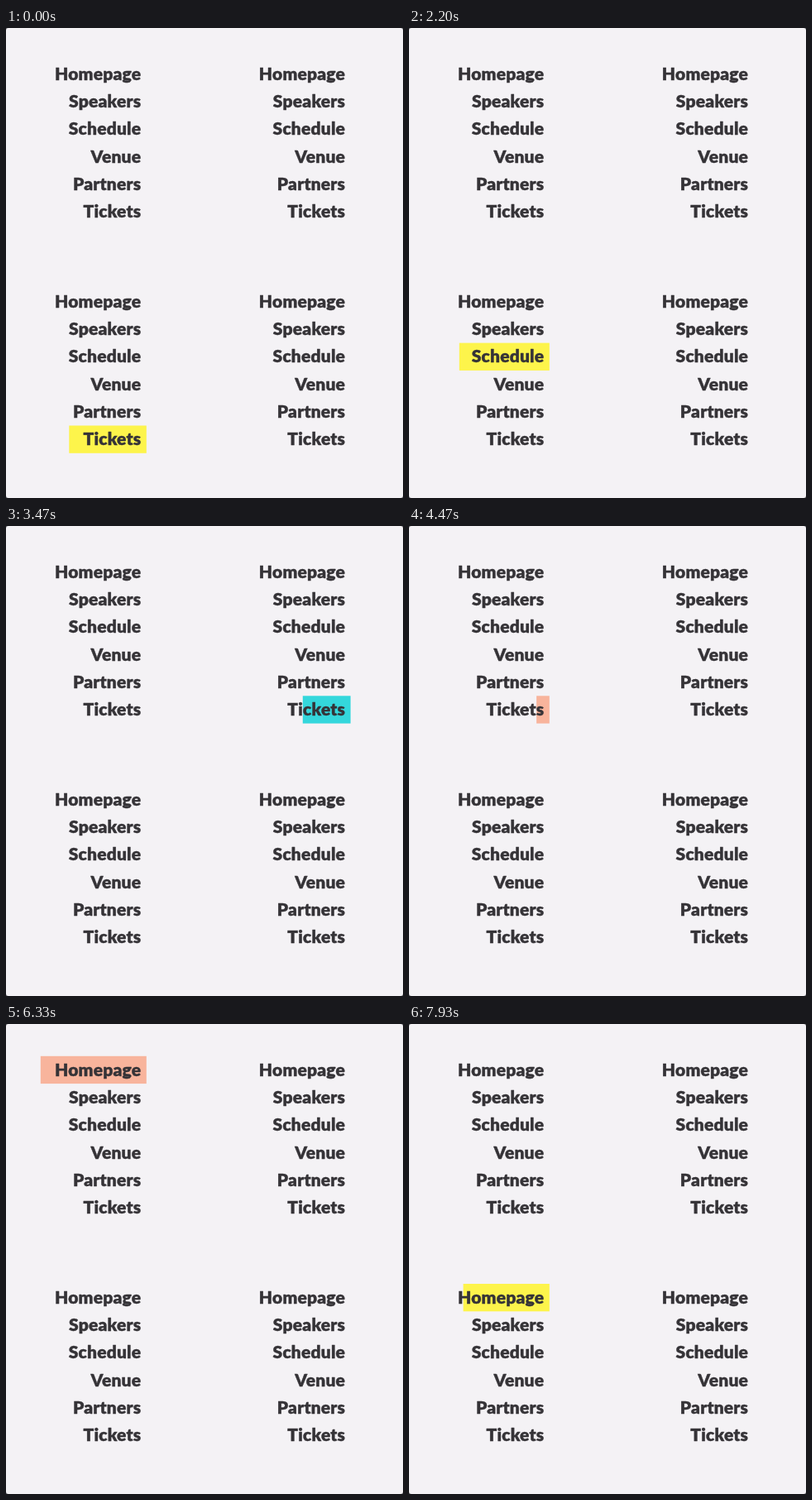
An HTML page with a canvas that plays this animation: 480 px wide and 568 px high, repeating every 8 s.

```html
<!DOCTYPE html>
<html lang="en">
<head>
<meta charset="utf-8">
<title>Menu hover highlights</title>
<style>
  html, body { margin: 0; width: 100%; height: 100%; overflow: hidden; background: #f4f2f5; }
  canvas { display: block; width: 480px; height: 568px; }
</style>
</head>
<body>
<canvas id="stage"></canvas>
<script>
const W = 480, H = 568, LOOP = 8000, FADE = 500;
const ROW = 33.3, TOP = 38.8;
const labels = ['Homepage', 'Speakers', 'Schedule', 'Venue', 'Partners', 'Tickets'];
const barWidths = [128, 110, 109, 86, 107, 93.5];

// Each menu: right edge of its bars, vertical offset, bar colour
const menus = {
  tl: { right: 169.8, dy: 0, color: '#f8b49c' },
  tr: { right: 416.6, dy: 0, color: '#34d7dc' },
  bl: { right: 169.8, dy: 275.2, color: '#fdf44b' },
  br: { right: 416.6, dy: 275.2, color: '#f34f7a' }
};

// menu, row, pointer enters (ms), pointer leaves (ms)
const hovers = [
  ['bl', 5, -900, 110],
  ['br', 3, 430, 1235],
  ['bl', 2, 1535, 2330],
  ['tr', 5, 2540, 3352],
  ['tl', 5, 3600, 4205],
  ['tr', 0, 4490, 5470],
  ['tl', 0, 5800, 6500],
  ['br', 0, 6760, 7280],
  ['bl', 0, 7675, 9000]
];

const canvas = document.getElementById('stage');
const ctx = canvas.getContext('2d');
const dpr = window.devicePixelRatio || 1;
canvas.width = W * dpr;
canvas.height = H * dpr;
ctx.scale(dpr, dpr);

const bezier = (a, b, u) => 3 * a * u * (1 - u) ** 2 + 3 * b * u * u * (1 - u) + u ** 3;

// The CSS "ease" curve, solved by bisection
function ease(x) {
  if (x <= 0) return 0;
  if (x >= 1) return 1;
  let lo = 0, hi = 1;
  for (let i = 0; i < 20; i++) {
    const mid = (lo + hi) / 2;
    if (bezier(0.25, 0.25, mid) < x) lo = mid; else hi = mid;
  }
  return bezier(0.1, 1, lo);
}

function drawBar([key, row, enter, leave], t) {
  const amount = ease((t - enter) / FADE) - ease((t - leave) / FADE);
  if (amount <= 0) return;
  const menu = menus[key];
  const width = barWidths[row] * amount;
  ctx.fillStyle = menu.color;
  ctx.fillRect(menu.right - width, TOP + menu.dy + row * ROW, width, ROW);
}

function drawLabels({ right, dy }) {
  labels.forEach((label, i) => {
    const x = right - 6.5, y = 62.6 + dy + i * ROW;
    ctx.fillText(label, x, y);
    ctx.strokeText(label, x, y);
  });
}

function draw(t) {
  ctx.fillStyle = '#55555a';
  ctx.fillRect(0, 0, W, H);
  ctx.fillStyle = '#f4f2f5';
  ctx.beginPath();
  ctx.roundRect(0, 0, W, H, 3);
  ctx.fill();

  hovers.forEach(hover => drawBar(hover, t));

  // A thin outline gives the labels their extra weight
  ctx.font = '900 21px Lato, "Open Sans", sans-serif';
  ctx.letterSpacing = '0.2px';
  ctx.textAlign = 'right';
  ctx.textBaseline = 'alphabetic';
  ctx.lineJoin = 'round';
  ctx.lineWidth = 0.4;
  ctx.fillStyle = ctx.strokeStyle = '#353337';
  Object.values(menus).forEach(drawLabels);
}

const start = performance.now();
function tick() {
  draw((performance.now() - start) % LOOP);
  requestAnimationFrame(tick);
}
tick();
</script>
</body>
</html>
```
